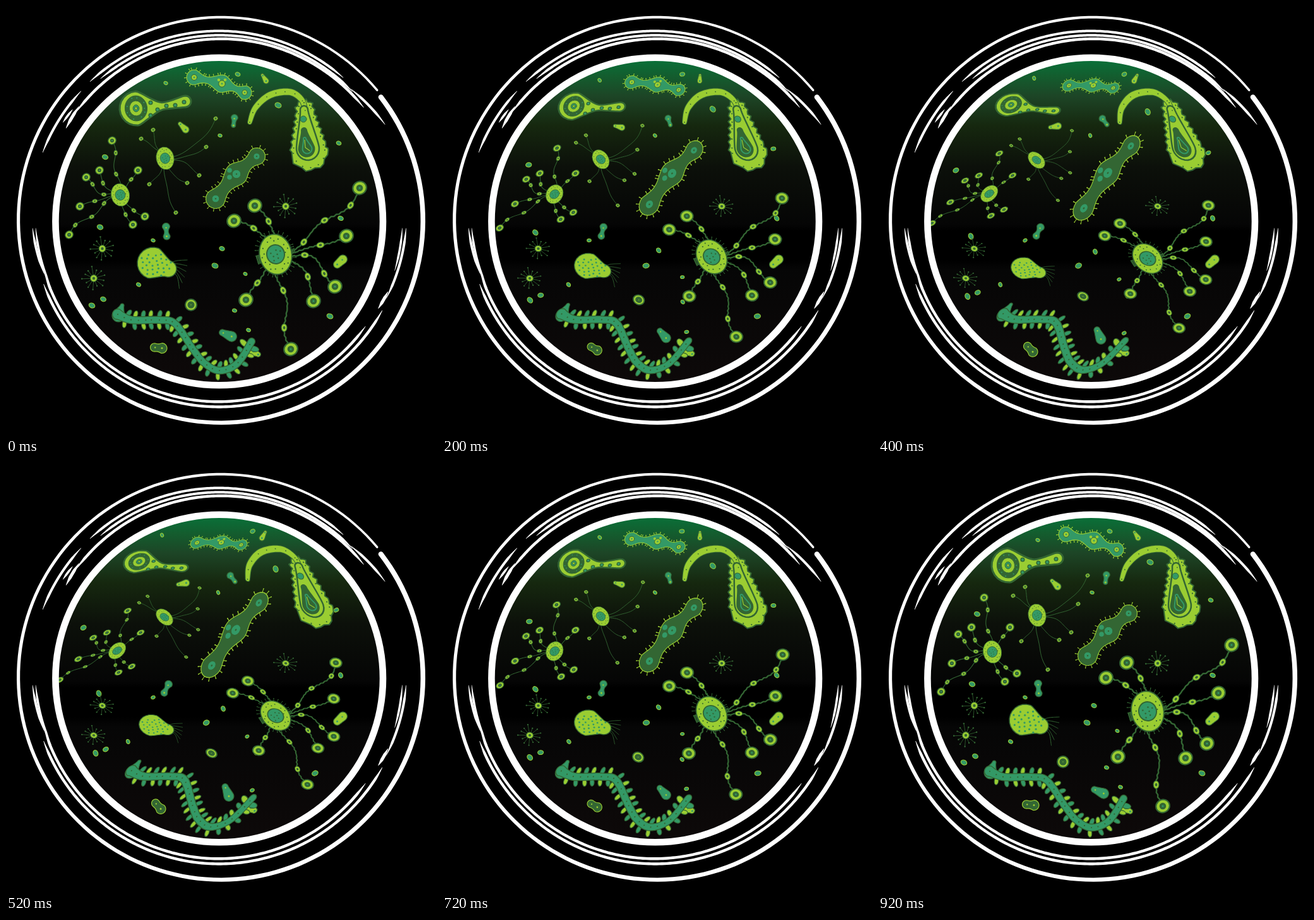
These frames come from a looping animation (681 by 679 pixels, 0.96 s). An HTML page with a canvas:

```html
<!DOCTYPE html>
<html lang="en">
<head>
<meta charset="utf-8">
<title>Petri dish</title>
<style>
html, body { margin: 0; width: 100%; height: 100%; overflow: hidden; background: #000; }
canvas { display: block; width: 681px; height: 679px; }
</style>
</head>
<body>
<canvas id="dish" width="681" height="679"></canvas>
<script>
const g = document.getElementById('dish').getContext('2d');
const LIME = '#9acd32', TEAL = '#339966', DARK = '#336633';
const { PI, sin, cos, atan2, hypot, min, max, floor, sqrt } = Math, TAU = PI * 2;
const LOOP = 960, STEP = 40, PEAK = 480, REST = 920;
let p = 0; // 0 at rest, 1 fully drifted

const lerp = (a, b, t = p) => a + (b - a) * t;
const turn = a => [cos(a), sin(a), -sin(a), cos(a)];

function sway(t) {
  const x = t < PEAK ? (t / PEAK) ** 1.1 : max(0, (REST - t) / (REST - PEAK)) ** 1.3;
  return sin(x * PI / 2);
}

// Draws in rest coordinates while the pivot drifts and the shape goes from rest to the given 2x2 matrix.
function pose(x, y, dx, dy, [a, b, c, d], draw) {
  g.save();
  g.translate(x + dx * p, y + dy * p);
  g.transform(lerp(1, a), lerp(0, b), lerp(0, c), lerp(1, d), 0, 0);
  g.translate(-x, -y);
  draw();
  g.restore();
}

// Open Catmull-Rom curve through [x, y] points.
function spline(pts, k = 16) {
  const n = pts.length - 1, at = i => pts[max(0, min(n, i))], out = [];
  for (let i = 0; i < n; i++) {
    for (let s = 0; s < k; s++) {
      const t = s / k;
      out.push([0, 1].map(c => {
        const [a, b, d, e] = [at(i - 1)[c], at(i)[c], at(i + 1)[c], at(i + 2)[c]];
        return b + .5 * t * (d - a + t * (2 * a - 5 * b + 4 * d - e + t * (3 * (b - d) + e - a)));
      }));
    }
  }
  return [...out, pts[n]];
}

function normal(pts, i) {
  const a = pts[max(0, i - 1)], b = pts[min(pts.length - 1, i + 1)];
  const d = hypot(b[0] - a[0], b[1] - a[1]) || 1;
  return [(b[1] - a[1]) / d, (a[0] - b[0]) / d];
}

const push = (pts, dist) => pts.map((q, i) => {
  const n = normal(pts, i), d = dist(i);
  return [q[0] + n[0] * d, q[1] + n[1] * d];
});

// Calls back at regular distances along a line.
function walk(pts, gap, visit) {
  let run = 0, k = 0;
  pts.forEach((q, i) => {
    if (i) run += hypot(q[0] - pts[i - 1][0], q[1] - pts[i - 1][1]);
    if (run >= k * gap) visit(q, normal(pts, i), k++);
  });
}

function ripple(pts, wave, amp) {
  let run = 0;
  return push(pts, i => {
    if (i) run += hypot(pts[i][0] - pts[i - 1][0], pts[i][1] - pts[i - 1][1]);
    return amp * sin(run / wave * TAU);
  });
}

// Outline of a line with varying width and round ends.
function ribbon(pts, width) {
  const n = pts.length - 1, half = i => width(i / n) / 2;
  const cap = (i, from) => Array.from({ length: 11 }, (_, k) => {
    const [nx, ny] = normal(pts, i), a = atan2(ny, nx) + from + (k + 1) * PI / 12;
    return [pts[i][0] + half(i) * cos(a), pts[i][1] + half(i) * sin(a)];
  });
  return [...push(pts, half), ...cap(n, 0), ...push(pts, i => -half(i)).reverse(), ...cap(0, PI)];
}

// Outline round a chain of [x, y, radius] lobes.
function lobes(list, pinch = 0) {
  const n = list.length - 1;
  return ribbon(spline(list.map(l => [l[0], l[1]])), t => {
    const i = min(n - 1, floor(t * n)), s = t * n - i;
    return 2 * lerp(list[i][2], list[i + 1][2], s * s * (3 - 2 * s)) * (1 - pinch * sin(PI * s) ** 2);
  });
}

function paint(fill, stroke, lw = 1) {
  if (fill) { g.fillStyle = fill; g.fill(); }
  if (stroke) { g.strokeStyle = stroke; g.lineWidth = lw; g.stroke(); }
}

function shape(pts, fill, stroke, lw) {
  g.beginPath();
  pts.forEach(q => g.lineTo(...q));
  g.closePath();
  paint(fill, stroke, lw);
}

function line(pts, color, lw) {
  g.beginPath();
  pts.forEach(q => g.lineTo(...q));
  paint(null, color, lw);
}

function oval(x, y, rx, ry, rot, fill, stroke, lw) {
  g.beginPath();
  g.ellipse(x, y, rx, ry, rot, 0, TAU);
  paint(fill, stroke, lw);
}
const dot = (x, y, r, ...style) => oval(x, y, r, r, 0, ...style);

function bristles(pts, gap, len, color) {
  walk(pts, gap, (q, n) => {
    const tip = [q[0] + n[0] * len, q[1] + n[1] * len];
    line([q, tip], color, 1);
    dot(...tip, .8, color);
  });
}

// Sunflower pattern of dots inside a tilted oval.
function speckle(x, y, rx, ry, rot, count, r, color, from = 0) {
  for (let i = 0; i < count; i++) {
    const d = lerp(from, 1, sqrt((i + .5) / count)), u = rx * d * cos(i * 2.4), v = ry * d * sin(i * 2.4);
    dot(x + u * cos(rot) - v * sin(rot), y + u * sin(rot) + v * cos(rot), r, color);
  }
}

function chain(list, pinch, fill, spot, gap) {
  const edge = lobes(list, pinch);
  shape(edge, fill, LIME, 1.1);
  bristles(edge, gap, gap * .55, LIME);
  list.forEach(([x, y, r]) => {
    dot(x, y, r * .38, spot, DARK, 1);
    dot(x, y, 1.3, fill);
  });
}

function topChain() {
  chain([[298, 113, 12], [342, 123, 14], [378, 137, 11]], .6, TEAL, LIME, 6);
  [337, 347].forEach(x => dot(x, 117, 2.3, LIME));
}

function darkChain() {
  chain([[397, 238, 13.5], [365, 266, 18], [332, 305, 15.5]], .42, DARK, TEAL, 8);
  [260, 271].forEach(y => dot(354, y, 3.8, TEAL));
}

function racket() {
  const [x, y] = [206, 162];
  shape(lobes([[207, 162, 27], [250, 158, 5.5], [284, 151, 9]]), LIME, DARK, 3);
  [[20, DARK], [12, LIME], [5.5, TEAL], [2.5, LIME]].forEach(([r, c]) => oval(x, y, r * .88, r, -.1, c, DARK, 1));
  speckle(x, y, 15, 18, 0, 10, 1, TEAL, .85);
  [[229, 153], [229, 173], [240, 164], [254, 158], [268, 157], [282, 152]].forEach(q => dot(...q, 2.8, TEAL, DARK, 1.5));
}

function flagellate() {
  const skin = lobes([[473, 163, 14], [480, 231, 29]]);
  const tail = spline([[386, 184], [395, 161], [418, 141], [449, 136], [468, 148], [474, 166]]);
  const hook = ribbon(tail, t => 6 + 4 * sin(PI * t));
  shape(ripple(skin, 11, 2.2), LIME, DARK, 2);
  shape(hook, LIME, DARK, 2);
  shape(hook, LIME);
  shape(lobes([[472, 164, 6], [478, 226, 18]]), LIME, DARK, 2.5);
  shape(lobes([[472, 197, 5], [476, 226, 13.5]]), DARK);
  shape(lobes([[473, 210, 2], [477, 226, 7.5]]), DARK, TEAL, 2);
  line([[473, 212], [474, 224], [481, 229]], LIME, 1.2);
  dot(471, 179, 5, TEAL, DARK, 1);
  walk(skin, 14, (q, n) => dot(q[0] - n[0] * 4, q[1] - n[1] * 4, 1.1, DARK));
  walk(tail, 16, q => dot(...q, .9, DARK));
}

// Cell with bent arms, each given as [end x, end y, beads, bend] from the centre.
function polyp(x, y, rx, ry, lw, bead, end, arms) {
  arms.forEach(([ex, ey, n, bend]) => {
    const at = f => {
      const s = bend * sin(PI * f) + (n > 1 ? .04 : .015) * sin(TAU * f * 1.5);
      return [x + ex * f - ey * s, y + ey * f + ex * s];
    };
    const path = Array.from({ length: 41 }, (_, i) => at(i / 40));
    line(lw > 2 ? ripple(path, 9, .8) : path, DARK, lw);
    for (let i = 1; i <= n; i++) {
      const f = i / (n + .6), a = at(f), b = at(f + .05), rot = atan2(b[1] - a[1], b[0] - a[0]);
      oval(...a, bead, bead * .72, rot, LIME, DARK, 1.1);
      oval(...a, bead * .4, bead * .3, rot, DARK);
    }
    const tip = at(1);
    oval(...tip, end, end * .92, -.5, LIME, DARK, end * .2);
    dot(...tip, end * .48, DARK);
    dot(...tip, end * .14, TEAL);
  });
  if (lw > 2) bristles(lobes([[x - 2, y - 7, rx], [x + 2, y + 6, rx]]), 3.4, 5, DARK);
  oval(x, y, rx, ry, -.2, LIME, DARK, lw * .8);
  speckle(x, y, rx * .86, ry * .86, -.2, 18, rx * .045, DARK, .65);
  oval(x, y, rx * .55, ry * .47, -.2, TEAL, DARK, lw * .8);
  speckle(x, y, rx * .38, ry * .34, 0, 7, rx * .05, DARK);
}

const spider = () => polyp(252, 241, 14, 18, 1, 0, 3.4, [
  [-38, -31, 0, .05], [-19, -45, 0, -.1], [80, -63, 0, .13], [65, -18, 0, .1],
  [54, 27, 0, -.12], [35, 39, 0, .15], [-25, 41, 0, -.1], [17, 86, 0, .08]]);

const leftCell = () => polyp(181, 299, 14.5, 18, 1.1, 4, 6.4, [
  [-13, -86, 2, 0], [28, -39, 1, 0], [-33, -39, 1, -.18], [-54, -28, 2, -.18],
  [-64, 18, 1, .03], [-81, 63, 3, .04], [20, 47, 1, .1], [39, 34, 1, .1]]);

const bigCell = () => polyp(427, 393, 25.5, 32, 2.4, 6.2, 11, [
  [-66, -53, 1, .14], [-33, -77, 1, .14], [133, -105, 3, .07], [112, -29, 1, .04],
  [94, 51, 2, -.19], [60, 74, 1, -.19], [24, 150, 2, 0], [-47, 72, 1, 0]]);

function bean() {
  for (let i = 0; i < 6; i++) {
    const y = 406 + i * 3;
    line(spline([[262, y], [271, y - 3 + i * 2], [287 - i * i * .5, 402 + i * 9]]), DARK, 1);
  }
  shape(lobes([[233, 407, 25], [257, 416, 13]]), LIME, DARK, 1.5);
  speckle(237, 409, 26, 19, .2, 28, 1.6, TEAL);
}

function worm() {
  const body = spline([[177, 488], [200, 497], [243, 497], [268, 503], [296, 543], [314, 565], [338, 577], [366, 566], [389, 531]]);
  nub(395, 549, 0, 0, .5, 0, 10, 7, 4, LIME, DARK);
  walk(body, 13, (q, n, k) => [1, -1].forEach(side => {
    if (k < 1 || k > 23) return;
    const a = atan2(n[1] * side, n[0] * side) + side * .25, size = k > 19 ? 1.3 : 1;
    oval(q[0] + cos(a) * 9.5, q[1] + sin(a) * 9.5, 6 * size, 3.3 * size, a, (k + (side > 0)) % 2 ? LIME : TEAL, DARK, 1.2);
  }));
  shape(lobes([[184, 474, 3], [178, 490, 10]]), TEAL, DARK, 1.2);
  shape(ribbon(body, t => 11 + 6 * Math.exp(-t * 16)), TEAL, DARK, 1.3);
  walk(body, 11, q => dot(...q, 1.1, DARK));
}

// Small two-ended lump that may turn as it drifts.
function nub(x, y, dx, dy, angle, spin, len, r1, r2, fill, stroke, pinch) {
  pose(x, y, dx, dy, turn(spin), () => {
    const ux = cos(angle) * len / 2, uy = sin(angle) * len / 2;
    shape(lobes([[x - ux, y - uy, r1], [x + ux, y + uy, r2]], pinch), fill, stroke, 1.2);
    dot(x - ux * .8, y - uy * .8, 1.2, fill === LIME ? TEAL : LIME);
    dot(x + ux, y + uy, 1.5, fill === LIME ? TEAL : LIME);
  });
}

function nubs() {
  nub(280, 191, -1, 0, .8, -1, 13, 3, 5.5, LIME, DARK);
  nub(409, 114, -1, 0, 1, 1.1, 11, 2.5, 4.5, LIME, DARK);
  nub(529, 405, 0, 0, 2.4, 0, 12, 7, 6, LIME, DARK);
  nub(361, 183, -2, 0, 1.7, -.8, 12, 5.5, 3.5, TEAL, DARK, .3);
  nub(254, 357, 0, 0, 1.5, .55, 15, 6, 5.5, TEAL, DARK, .45);
  nub(241, 541, 0, 2, .1, .75, 12, 6.5, 8, DARK, LIME, .15);
  nub(350, 520, 0, 0, .4, .8, 16, 5, 8, TEAL, DARK);
}

function burst(x, y) {
  pose(x, y, 0, 0, [1, .1, 0, .8], () => {
    for (let i = 0; i < 13; i++) {
      const a = i * TAU / 13 + .2, d = 16 + 3 * sin(i * 2.3), tip = [x + d * cos(a), y + d * sin(a)];
      line([[x, y], tip], DARK, .8);
      dot(...tip, 1.2, DARK);
    }
    dot(x, y, 5.4, LIME, DARK, 1);
    dot(x, y, 2.2, DARK);
  });
}

function crumbs() {
  // x, y and drift
  [[253, 122, -6, -8], [367, 108, 24, 0], [431, 157, -4, 11], [527, 217, -4, 16], [339, 205, -3, 0],
   [157, 239, -35, 22], [149, 350, -2, 15], [233, 371, 0, 0], [210, 441, -17, 0], [331, 411, -14, 0],
   [342, 384, 2, 5], [379, 424, 3, 9], [530, 336, 0, 0], [513, 491, -24, 0], [362, 482, 34, -24],
   [384, 513, 6, 5], [136, 474, 6, -15], [154, 464, 4, -11]
  ].forEach(([x, y, dx, dy], i) => {
    const r = 4.1 + sin(i * 1.75 - 1.9), rot = lerp(.4, i % 2 ? -.5 : 1.2);
    oval(x + dx * p, y + dy * p, r, r * .76, rot, TEAL, LIME, 1.1);
  });
  pose(293, 473, 33, -14, [.95, .2, 0, .75], () => {
    [[9, LIME], [4.6, DARK], [1.7, LIME]].forEach(([r, c]) => dot(293, 473, r, c, DARK, 2));
  });
}

// White stroke round (x, y); angles in degrees, radius and width run from first to second.
function brush(x, y, a0, a1, r0, r1, w0, w1, fade) {
  const arc = Array.from({ length: 161 }, (_, i) => {
    const a = lerp(a0, a1, i / 160) * PI / 180, r = lerp(r0, r1, i / 160);
    return [x + r * cos(a), y + r * sin(a)];
  });
  shape(ribbon(arc, t => lerp(w0, w1, t) * (fade ? min(1, min(t, 1 - t) / fade + .15) : 1)), '#fff');
}

function glass() {
  dot(337.7, 341, 259.3, null, '#fff', 10.6);
  brush(340.5, 339.2, -39.8, -397.6, 321.8, 319.6, 3.4, 8, 0);
  // start, end, radii, width
  [[-133, -49, 300, 299, 4], [-130, -44, 292.5, 293, 4], [-143, -38, 284, 290, 4.4],
   [-45, -30, 294, 303, 4], [-159, -137, 299.5, 299.5, 4], [-149, -141, 283, 286, 5],
   [-148, -143, 292, 291, 3.5], [2.5, 25, 296, 292, 4], [2.5, 16, 290, 289, 3.5],
   [23, 29, 290, 288, 5], [29, 160, 295, 296, 4.4], [36, 163, 286, 289, 4.4],
   [177.5, 163, 296, 290, 4], [177.5, 158, 291, 287, 3.5]
  ].forEach(([a0, a1, r0, r1, w]) => brush(337.8, 339, a0, a1, r0, r1, w, w, min(.4, 5 / Math.abs(a1 - a0))));
}

const sky = g.createLinearGradient(0, 87, 0, 595);
[[0, '#0a6f38'], [.05, '#145c2e'], [.11, '#1d4526'], [.2, '#16280f'], [.33, '#0c100a'], [.51, '#050505'],
 [.53, '#000'], [.62, '#000'], [.65, '#060606'], [1, '#0d0909']].forEach(s => sky.addColorStop(...s));

function draw() {
  const still = p;
  g.fillStyle = '#000';
  g.fillRect(0, 0, 681, 679);
  g.save();
  g.beginPath();
  g.arc(337.7, 341, 257, 0, TAU);
  g.clip();
  g.fillStyle = sky;
  g.fillRect(80, 80, 520, 520);
  crumbs();
  nubs();
  pose(342, 122, -1, 3, [.87, -.18, 0, .73], topChain);
  pose(206, 162, 5, -6, [.82, .22, -.45, .62], racket);
  pose(440, 186, -3, 0, [1, 0, .25, 1], flagellate);
  pose(366, 267, -1, -2, [1.1, -.3, -.05, 1.2], darkChain);
  pose(252, 241, -1, 3, [.87, 0, .23, .73], spider);
  pose(181, 299, -5, -2, [.87, 0, -.33, .73], leftCell);
  pose(427, 393, 0, 7, [.87, -.05, .2, .73], bigCell);
  pose(239, 409, -1, 8, [.87, 0, .1, .68], bean);
  pose(389, 531, 2, -1, [.98, 0, -.37, 1], worm);
  burst(152.5, 384);
  burst(139, 431);
  burst(443, 317);
  g.restore();
  glass();
}

const start = performance.now();
let shown = -1;
function tick() {
  const step = floor((performance.now() - start) % LOOP / STEP);
  if (step !== shown) {
    shown = step;
    p = sway(step * STEP);
    draw();
  }
  requestAnimationFrame(tick);
}
g.lineJoin = g.lineCap = 'round';
tick();
</script>
</body>
</html>
```
